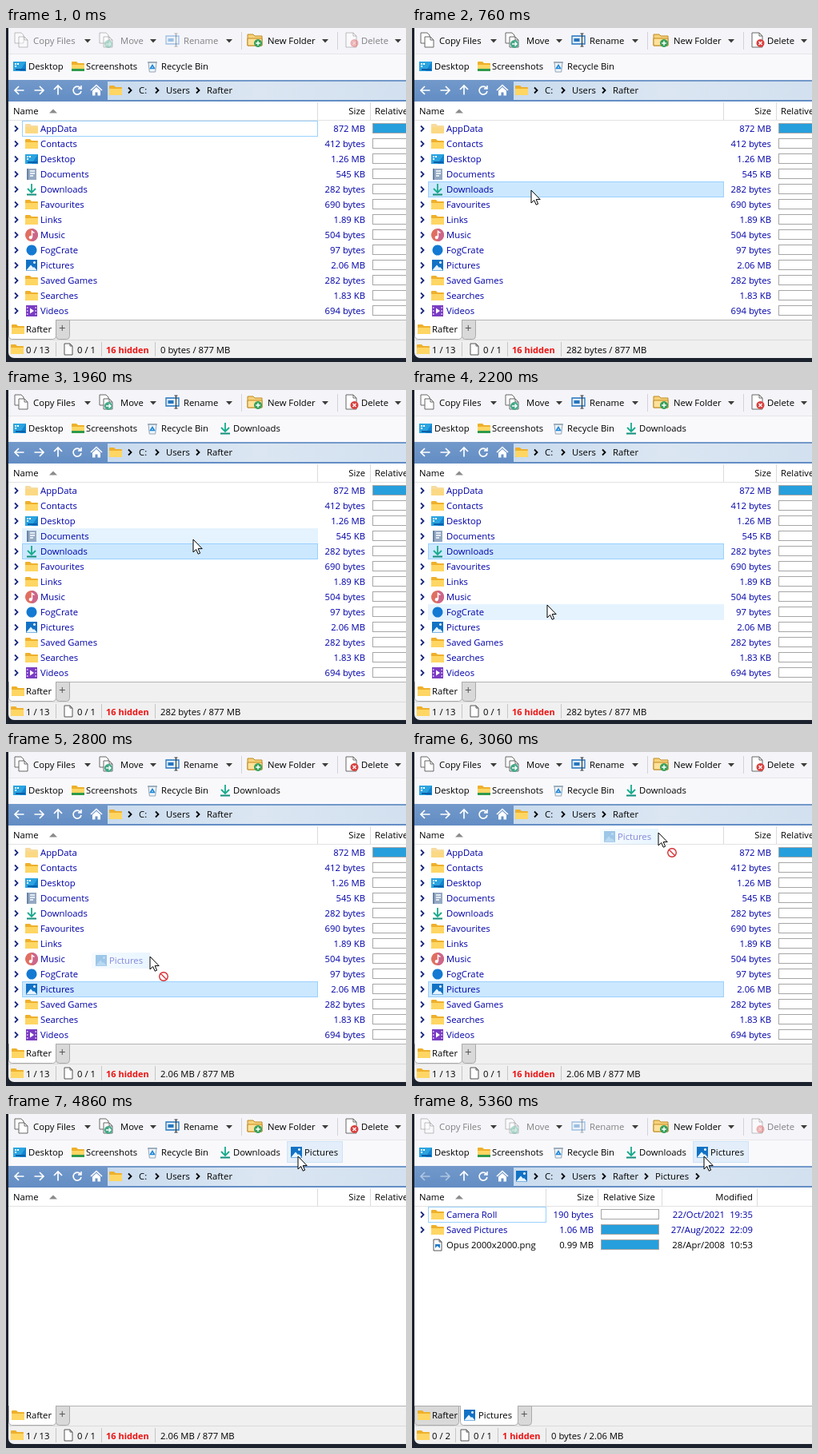
Write an HTML page with a canvas that moves like this. It is 500 px wide and 418 px high and loops after 6.3 s.

```html
<!DOCTYPE html>
<html lang="en">
<head>
<meta charset="utf-8">
<title>File manager favourites</title>
<style>
html, body { margin: 0; width: 100%; height: 100%; overflow: hidden; background: #1b222d; }
canvas { display: block; width: 500px; height: 418px; }
</style>
</head>
<body>
<canvas id="stage" width="500" height="418"></canvas>
<script>
const g = document.getElementById('stage').getContext('2d');
const LOOP = 6300;
const FONT = '"Open Sans", "Noto Sans", sans-serif';
const NAVY = '#0000a8', INK = '#000';
const USER = 'Rafter';

// Each layer: path, fill, stroke, stroke width
const FOLDER = [['M0 3q0-1 1-1h5l2 2h7q1 0 1 1v9H0z', '#eeb02c'], ['M0 6h16v7q0 1-1 1H1q-1 0-1-1z', '#ffd663']];
const PAGE = [['M3 1h7l3 3v11H3z', '#fff', '#555', 1], ['M10 1v3h3', null, '#555', 1]];
const PAIR = [['M1 1h8l3 3v10H1z', '#fff', '#666', 1], ['M6 6h7l4 4v9H6z', '#fff', '#666', 1], ['M13 6v4h4', null, '#666', 1]];
const ICONS = {
  folder: FOLDER,
  page: PAGE,
  desktop: [['M0 2h16v12H0z', '#1583cf'], ['M0 2h16L8 14H0z', '#2ba4e0'], ['M2 4h2v2H2zM2 7h2v2H2zM5 4h2v2H5z', '#fff'], ['M3 11h12v2H3z', '#0b5fa8']],
  documents: [['M2 1h12v14H2z', '#94a9c3'], ['M2 1h2v14H2z', '#6a83a3'], ['M6 4h6M6 7h6M6 10h4', null, '#fff', 1.4]],
  download: [['M8 1v10M3 7l5 5 5-5', null, '#17ab8c', 1.8], ['M2 14.5h12', null, '#138f7c', 1.8]],
  music: [['M8 0a8 8 0 1 0 .01 0z', '#df6f62'], ['M8 0a8 8 0 0 1 0 16z', '#cc668a'], ['M8.5 11V3.5l3 2', null, '#fff', 1.5], ['M6.8 9a2.1 2.1 0 1 0 .01 0z', '#fff']],
  disc: [['M8 1.5a6.5 6.5 0 1 0 .01 0z', '#1479d2']],
  pictures: [['M1 1h14v14H1z', '#1272c4'], ['M1 14.5l6-7 3 3.5 1-1 4 4.5z', '#e8f5ff'], ['M11.5 3a1.5 1.5 0 1 0 .01 0z', '#fff']],
  video: [['M1 1h14v14H1z', '#7a3cc2'], ['M2 3h1.5v2H2zM2 7h1.5v2H2zM2 11h1.5v2H2zM12.5 3H14v2h-1.5zM12.5 7H14v2h-1.5zM12.5 11H14v2h-1.5z', '#d9b8ff'], ['M6 4.5l5 3.5-5 3.5z', '#fff']],
  shots: [...FOLDER, ['M0 11h16v3H0z', '#2f9a4c']],
  recycle: [['M3 3h10l-1.3 12H4.3z', '#eef4f9', '#93a4b2', 1], ['M2 3h12', null, '#93a4b2', 1.4], ['M5.5 10.5L8 6.5l2.5 4z', null, '#1c86d8', 1.5]],
  png: [...PAGE, ['M5 7h6v5H5z', '#1c78c8'], ['M5 12l2.5-3 3.5 3z', '#fff']],
  copy: PAIR,
  move: [...PAIR, ['M12 10a5 5 0 1 0 .01 0z', '#43a887'], ['M9 15h6M12.5 12.5L15 15l-2.5 2.5', null, '#fff', 1.3]],
  rename: [['M2 5h16v10H2z', '#dcebfa', '#2775bd', 1.3], ['M4.5 8h7v4h-7z', '#2775bd'], ['M14.5 2v16M12.5 2h4M12.5 18h4', null, '#333', 1.1]],
  newFolder: [['M1 3h7l2 2h9v12H1z', '#f6d27c', '#c18a20', 1], ['M1 8h18v9H1z', '#ffe19a', '#c18a20', 1], ['M14 9a5 5 0 1 0 .01 0z', '#37a05c'], ['M14 11.2v5.6M11.2 14h5.6', null, '#fff', 1.5]],
  remove: [['M2 1h9l4 4v14H2z', '#fff', '#666', 1], ['M11 1v4h4', null, '#666', 1], ['M12.5 9a5 5 0 1 0 .01 0z', '#d8413f'], ['M10.5 12l4 4M14.5 12l-4 4', null, '#fff', 1.4]]
};

const HOME_ROWS = [
  ['AppData', 'folder', '872 MB'], ['Contacts', 'folder', '412 bytes'], ['Desktop', 'desktop', '1.26 MB'],
  ['Documents', 'documents', '545 KB'], ['Downloads', 'download', '282 bytes'], ['Favourites', 'folder', '690 bytes'],
  ['Links', 'folder', '1.89 KB'], ['Music', 'music', '504 bytes'], ['FogCrate', 'disc', '97 bytes'],
  ['Pictures', 'pictures', '2.06 MB'], ['Saved Games', 'folder', '282 bytes'], ['Searches', 'folder', '1.83 KB'],
  ['Videos', 'video', '694 bytes']
];
const PICTURE_ROWS = [
  ['Camera Roll', 'folder', '190 bytes', '22/Oct/2021', '19:35'],
  ['Saved Pictures', 'folder', '1.06 MB', '27/Aug/2022', '22:09'],
  ['Opus 2000x2000.png', 'png', '0.99 MB', '28/Apr/2008', '10:53']
];
// label, icon, icon x, text x, arrow x, needs a selection
const TOOLS = [
  ['Copy Files', 'copy', 10, 34, 102, true], ['Move', 'move', 116, 143, 184, true], ['Rename', 'rename', 198, 222, 279, true],
  ['New Folder', 'newFolder', 301, 327, 399, false], ['Delete', 'remove', 423, 444, 490, true]
];
// label, icon, left edge, right edge, text x, time it appears
const FAVOURITES = [
  ['Desktop', 'desktop', 5, 77, 28, 0], ['Screenshots', 'shots', 78, 171, 100, 0], ['Recycle Bin', 'recycle', 171, 260, 194, 0],
  ['Downloads', 'download', 262, 349, 284, 1630], ['Pictures', 'pictures', 351, 421, 373, 3760]
];
// time, x, y, easing into this point
const outQuad = k => 1 - (1 - k) ** 2;
const smooth = k => k * k * (3 - 2 * k);
const PATH = [
  [60, 500, 178], [500, 149, 203, outQuad], [1060, 149, 203], [1330, 332, 60, smooth], [1430, 340, 52, outQuad],
  [1630, 340, 52], [2200, 169, 269, smooth], [2260, 165, 288], [2330, 165, 288], [2500, 150, 293, outQuad],
  [2700, 150, 293], [3060, 308, 101, smooth], [3330, 352, 72, outQuad], [3640, 365, 53, outQuad]
];
const DRAGS = [
  { row: 4, from: 1060, to: 1630, width: 87, dy: 1, mark: 260 },
  { row: 9, from: 2720, to: 3760, width: 73, dy: 5, mark: 347 }
];

function pointer(t) {
  const i = PATH.findIndex(p => p[0] > t);
  if (i < 0) return PATH[PATH.length - 1].slice(1, 3);
  const a = PATH[Math.max(0, i - 1)], b = PATH[i];
  const k = (b[3] || (v => v))(Math.max(0, (t - a[0]) / (b[0] - a[0] || 1)));
  return [a[1] + (b[1] - a[1]) * k, a[2] + (b[2] - a[2]) * k].map(Math.round);
}

function rect(x, y, w, h, color) {
  g.fillStyle = color;
  g.fillRect(x, y, w, h);
}
function frame(x, y, w, h, color) {
  g.strokeStyle = color;
  g.lineWidth = 1;
  g.strokeRect(x + .5, y + .5, w - 1, h - 1);
}
function text(s, x, y, color = INK, align = 'left', weight = 400, size = 11.3) {
  g.font = `${weight} ${size}px ${FONT}`;
  g.textAlign = align;
  g.fillStyle = color;
  g.fillText(s, x, y);
}
function shape(d, x, y, fill, stroke, width = 1) {
  const p = new Path2D(d);
  g.save();
  g.translate(x, y);
  if (fill) { g.fillStyle = fill; g.fill(p); }
  if (stroke) { g.strokeStyle = stroke; g.lineWidth = width; g.stroke(p); }
  g.restore();
}
function icon(name, x, y, alpha = 1) {
  g.save();
  g.globalAlpha *= alpha;
  for (const [d, ...style] of ICONS[name]) shape(d, x, y, ...style);
  g.restore();
}
const chevron = (x, y, color) => shape('M-2-3.5L1.5 0-2 3.5', x, y, null, color, 1.8);

function toolbar(enabled) {
  rect(3, 0, 497, 32, '#f5f5f9');
  for (const [label, name, ix, tx, ax, needs] of TOOLS) {
    const on = enabled || !needs;
    icon(name, ix, 5, on ? 1 : .4);
    text(label, tx, 20, on ? INK : '#808084');
    shape('M-4-2h8L0 2.5z', ax, 16, '#3c3c3c');
  }
  for (const x of [294, 414]) rect(x, 5, 1, 22, '#d2d2d8');
}

function favourites(t, x, y, dragging) {
  rect(3, 32, 497, 33, '#f9f9fc');
  rect(3, 32, 497, 1, '#e6e6ea');
  for (const [label, name, left, right, tx, since] of FAVOURITES) {
    if (t < since) continue;
    if (t >= 60 && !dragging && y >= 34 && y < 62 && x >= left && x < right) {
      const pressed = t >= 4760 && t < 4860;
      rect(left, 34, right - left, 27, pressed ? '#cce4f7' : '#e3eefa');
      frame(left, 34, right - left, 27, pressed ? '#8fc1ea' : '#cfe3f6');
    }
    icon(name, left + 4, 40);
    text(label, tx, 52);
  }
}

function pathBar(opened) {
  const blue = g.createLinearGradient(0, 65, 0, 92);
  blue.addColorStop(0, '#7399ca');
  blue.addColorStop(1, '#628dc4');
  rect(3, 65, 497, 27, blue);
  const pale = g.createLinearGradient(127, 0, 500, 0);
  pale.addColorStop(0, '#c9dbee');
  pale.addColorStop(.5, '#dbe6f2');
  pale.addColorStop(1, '#d2e0ef');
  rect(127, 67, 373, 23, pale);
  g.globalAlpha = opened ? .45 : 1;
  shape('M5.5 0h-11M-1-5l-5 5 5 5', 17, 78, null, '#fff', 1.7);
  shape('M-5.5 0h11M1-5l5 5-5 5', 41, 78, null, '#fff', 1.7);
  g.globalAlpha = 1;
  shape('M0 5.5v-11M-5-1l5-5 5 5', 65, 78, null, '#fff', 1.7);
  shape('M4-3a5 5 0 1 0 1 4M5-6v4H1', 89, 78, null, '#fff', 1.6);
  shape('M-7 0L0-6.5 7 0', 113, 78, null, '#fff', 1.6);
  shape('M-5 .5L0-4 5 .5V6.5H1.5v-4h-3v4H-5z', 113, 78, '#fff');
  icon(opened ? 'pictures' : 'folder', 129, 70);
  [['C:', 166], ['Users', 200], [USER, 251], ['Pictures', 304]].slice(0, opened ? 4 : 3).forEach(([s, x]) => text(s, x, 82));
  [155, 189, 240, 293, 357].slice(0, opened ? 5 : 3).forEach(x => chevron(x, 78, INK));
}

function header(opened) {
  rect(3, 92, 497, 273, '#fff');
  rect(3, 115, 497, 1, '#e2e2e2');
  text('Name', 9, 108);
  shape('M-5 2.5h10L0-2.5z', 59, 104, '#8b8b8b');
  const lines = opened ? [167, 232, 312, 431] : [389, 455];
  for (const x of lines) rect(x, 93, 1, 22, '#dcdcdc');
  text('Size', opened ? 227 : 449, 108, INK, 'right');
  text('Relative Size', opened ? 239 : 461, 108);
  if (opened) text('Modified', 426, 108, INK, 'right');
}

function rows(list, opened, selected, hover, focus) {
  const right = opened ? 168 : 390;
  const sizeX = opened ? 227 : 449;
  const barX = opened ? 236 : 458;
  list.forEach(([name, kind, size, date, time], i) => {
    const y = 126 + 19 * i;
    const color = kind === 'png' ? INK : NAVY;
    const box = [20, y - 10, right - 20, 20];
    if (i === selected) {
      rect(...box, '#cce8ff');
      frame(...box, '#99d1ff');
    } else if (i === hover) rect(...box, '#e5f3ff');
    if (i === focus) frame(...box, '#99d1ff');
    if (kind !== 'png') chevron(13, y, '#1c2a80');
    icon(kind, 24, y - 8, name === 'AppData' ? .45 : 1);
    text(name, 43, y + 4, color);
    text(size, sizeX, y + 4, color, 'right');
    const full = opened ? i > 0 : i === 0;
    rect(barX, y - 7, 73, 13, full ? '#269fdc' : '#fff');
    frame(barX, y - 7, 73, 13, '#a6a6a6');
    if (date) {
      text(date, 391, y + 4, color, 'right');
      text(time, 426, y + 4, color, 'right');
    }
  });
}

function tab(x, w, fill, name, label, tx) {
  g.beginPath();
  g.roundRect(x + .5, 365.5, w - 1, 24, [0, 0, 4, 4]);
  g.fillStyle = fill;
  g.fill();
  g.strokeStyle = '#aaa';
  g.lineWidth = 1;
  g.stroke();
  if (fill === '#fff') rect(x + 1, 364, w - 2, 3, '#fff');
  if (name) icon(name, x + 4, 369);
  text(label, tx, 381, name ? INK : '#555', 'left', 400, name ? 11.3 : 15);
}

function tabs(opened) {
  rect(3, 366, 497, 24, '#f0f0f0');
  rect(3, 365, 497, 1, '#b4b4b4');
  tab(3, opened ? 56 : 60, opened ? '#d9d9d9' : '#fff', 'folder', USER, 25);
  if (opened) tab(60, 73, '#fff', 'pictures', 'Pictures', 83);
  const x = opened ? 132 : 62;
  tab(x, 18, '#d9d9d9', null, '+', x + 4);
}

function status(count, hidden, total, shift) {
  rect(3, 390, 497, 23, '#f0f0f0');
  rect(3, 390, 497, 1, '#dadada');
  icon('folder', 6, 394);
  text(count, 25, 407);
  const [a, b, c] = shift ? [54, 107, 167] : [62, 119, 186];
  for (const x of [a, b, c]) rect(x, 393, 1, 18, '#c6c6c6');
  icon('page', b - 49, 394);
  text('0 / 1', b - 30, 407);
  text(hidden, b + 6, 407, '#ee1111', 'left', 700, 11);
  text(total, c + 7, 407);
}

function dragLayer(drag, x, y) {
  const [label, name] = HOME_ROWS[drag.row];
  const left = x - drag.width, cy = y + drag.dy;
  const overBar = y < 64;
  if (overBar) {
    rect(drag.mark - 4, 59, 9, 2, INK);
    rect(drag.mark - 1, 51, 1, 8, INK);
    rect(drag.mark + 1, 51, 1, 8, INK);
  }
  g.save();
  g.globalAlpha = .45;
  const fade = g.createLinearGradient(left, 0, x, 0);
  fade.addColorStop(0, '#cce8ff60');
  fade.addColorStop(1, '#cce8ff');
  rect(left, cy - 10, drag.width, 20, fade);
  icon(name, left + 4, cy - 8, .85);
  text(label, left + 22, cy + 4, NAVY);
  g.restore();
  if (overBar) {
    rect(x + 11, y + 15, 113, 19, '#fff');
    frame(x + 11, y + 15, 113, 19, '#e6e6e6');
    shape('M-5 0H5M0-5V5', x + 19.5, y + 24.5, null, '#222', 1);
    text('Add To Favorites', x + 30, y + 28, NAVY);
  } else {
    shape('M0-5.3a5.3 5.3 0 1 0 .01 0zM-3.7-3.7L3.7 3.7', x + 17, y + 25, '#fff', '#d6343a', 1.4);
  }
}

function draw(t) {
  const [x, y] = pointer(t);
  const drag = DRAGS.find(d => t >= d.from && t < d.to);
  const opened = t >= 5060;
  const selected = t < 760 ? -1 : t < 2700 ? 4 : 9;
  const hover = t >= 60 && !drag && x >= 20 && x < 390 && y >= 116 ? Math.floor((y - 116) / 19) : -1;

  rect(0, 0, 500, 418, '#1b222d');
  g.save();
  g.beginPath();
  g.roundRect(3, -10, 520, 423, 7);
  g.clip();
  toolbar(t >= 760 && t < 5200);
  favourites(t, x, y, drag);
  pathBar(opened);
  header(opened);
  if (t < 4860) rows(HOME_ROWS, false, selected, hover, t < 760 ? 0 : -1);
  if (t >= 5120) rows(PICTURE_ROWS, true, -1, -1, 0);
  tabs(opened);
  if (opened) status('0 / 2', '1 hidden', '0 bytes / 2.06 MB', true);
  else status(selected < 0 ? '0 / 13' : '1 / 13', '16 hidden', (selected < 0 ? '0 bytes' : HOME_ROWS[selected][2]) + ' / 877 MB', false);
  g.restore();

  if (drag) dragLayer(drag, x, y);
  if (t >= 60) shape('M.5.5v16l3.7-3.5 2.5 5.7 2.4-1-2.4-5.6h5z', x - .5, y - .5, '#fff', '#000', 1);
}

function tick(now) {
  draw(now % LOOP);
  requestAnimationFrame(tick);
}
draw(0);
requestAnimationFrame(tick);
</script>
</body>
</html>
```
